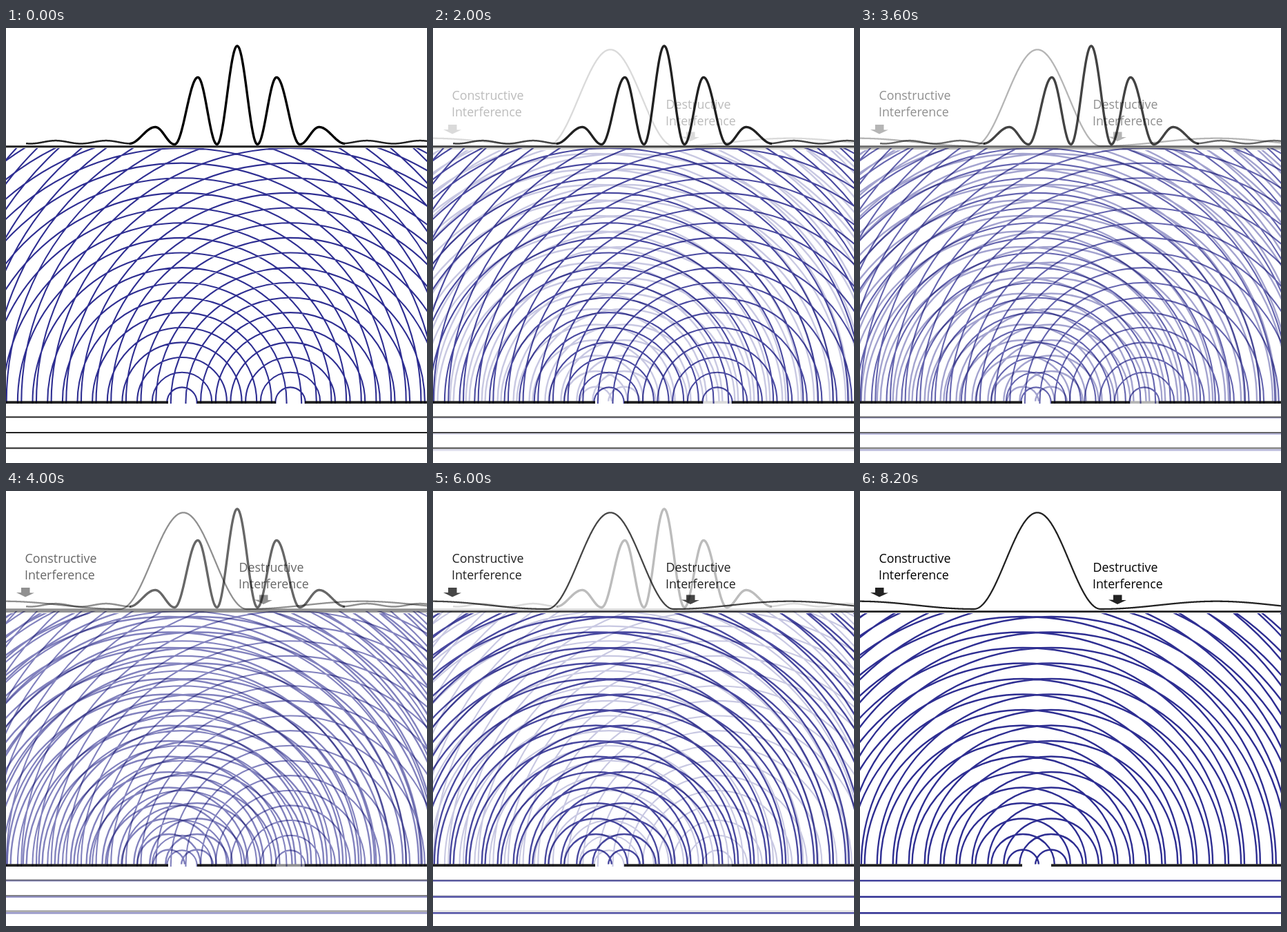
Recreate the animation shown at these times as an HTML page with a canvas. Size 610 px wide and 630 px high, loop 9000 ms.

```html
<!DOCTYPE html>
<html>
<head>
<meta charset="utf-8">
<style>
html, body { margin: 0; overflow: hidden; background: #fff; }
canvas { display: block; }
</style>
</head>
<body>
<canvas id="stage" width="610" height="630"></canvas>
<script>
const ctx = document.getElementById('stage').getContext('2d');
const BLUE = '#2e2e92', INK = '#222';
const WIDTH = 610, HEIGHT = 630, SLIT_Y = 542;

function stroke(color, width) {
  ctx.strokeStyle = color;
  ctx.lineWidth = width;
  ctx.stroke();
}

function line(y, width, color, x0 = 0, x1 = WIDTH) {
  ctx.beginPath();
  ctx.moveTo(x0, y);
  ctx.lineTo(x1, y);
  stroke(color, width);
}

const wall = (x0, x1) => line(SLIT_Y + 0.2, 3.8, INK, x0, x1);

function planeWaves(y, gap, width, color) {
  for (let i = 0; i < 3; i++) line(y + i * gap, width, color);
}

// Both wave families share one path so crossings do not darken.
function waves(centers, stepX, stepY, top, bottom, width) {
  ctx.save();
  ctx.beginPath();
  ctx.rect(0, top, WIDTH, bottom - top);
  ctx.clip();
  ctx.beginPath();
  for (const cx of centers) {
    for (let n = 1; n <= 26; n++) {
      const rx = n * stepX;
      ctx.moveTo(cx - rx, SLIT_Y + 3);
      ctx.lineTo(cx - rx, SLIT_Y);
      ctx.ellipse(cx, SLIT_Y, rx, n * stepY, 0, Math.PI, 2 * Math.PI);
      ctx.lineTo(cx + rx, SLIT_Y + 3);
    }
  }
  stroke(BLUE, width);
  ctx.restore();
}

function plot(f, x0, x1, width, color) {
  ctx.beginPath();
  for (let x = x0; x <= x1; x += 0.5) ctx.lineTo(x, f(x));
  ctx.lineJoin = 'round';
  stroke(color, width);
}

// Cosine easing from a to b as t goes from 0 to 1.
const ease = (a, b, t) => a + (b - a) * (1 - Math.cos(Math.PI * t)) / 2;

const ripple = (crest, period) =>
  x => 165.3 - 2.2 * Math.cos(2 * Math.PI * (x - crest) / period);

// Extremes as [distance from the middle, y]; both sides mirror each other.
const FRINGES = [[0, 26], [29.3, 168.5], [57, 71.5], [90.7, 168.5], [118.7, 143.5], [156.5, 167.5]];

function fringes(x) {
  const d = Math.abs(x - 335);
  const i = FRINGES.findIndex(([edge]) => edge > d);
  const [d0, y0] = FRINGES[i - 1], [d1, y1] = FRINGES[i];
  return ease(y0, y1, (d - d0) / (d1 - d0));
}

function singlePeak(x) {
  const d = Math.abs(x - 257), foot = 92;
  if (d < foot) return ease(31.3, 171, d / foot);
  return 171 - 11.3 * Math.sin(Math.PI * (d - foot) / 335) ** 2;
}

function label(word, x, y) {
  ctx.fillStyle = '#000';
  ctx.font = '17.8px "Open Sans", "Noto Sans", sans-serif';
  ctx.fillText(word, x, y);
  ctx.fillText('Interference', x - 0.5, y + 24);
}

function arrow(x, y) {
  ctx.beginPath();
  ctx.rect(x - 6, y, 12.5, 8);
  ctx.moveTo(x - 13, y + 7);
  ctx.lineTo(x + 13, y + 7.5);
  ctx.lineTo(x, y + 13.5);
  ctx.fillStyle = INK;
  ctx.fill();
}

// Waves, text and fringes fade less evenly than the thin dark lines.
const strong = amount => amount ** 0.75;

function wideSlits(amount) {
  ctx.globalAlpha = strong(amount);
  waves([255, 412], 21.65, 21.65, 174, 544, 2.1);
  plot(fringes, 179, 491, 3.4, '#000');
  ctx.globalAlpha = amount;
  line(171.8, 3, INK);
  planeWaves(563.5, 22.5, 2, INK);
  plot(ripple(72, 73), 29, 181, 2.5, INK);
  plot(ripple(523, 77), 488, WIDTH, 2.5, INK);
}

function narrowSlits(amount) {
  ctx.globalAlpha = strong(amount);
  waves([236, 277], 22.93, 22.5, 177, 540.5, 2.4);
  label('Constructive', 27.5, 104);
  label('Destructive', 337.5, 117);
  ctx.globalAlpha = amount;
  line(174.6, 2.8, INK);
  planeWaves(564.4, 23.4, 2.4, BLUE);
  wall(391, 433);
  plot(singlePeak, 0, WIDTH, 2.3, INK);
  arrow(28, 140);
  arrow(373, 150.5);
}

function draw(now) {
  const second = Math.floor(now % 9000 / 1000);
  const mix = Math.min(6, Math.max(0, second - 1)) / 6;
  ctx.globalCompositeOperation = 'source-over';
  ctx.globalAlpha = 1;
  ctx.fillStyle = '#fff';
  ctx.fillRect(0, 0, WIDTH, HEIGHT);
  ctx.globalCompositeOperation = 'multiply';
  if (mix < 1) wideSlits(1 - mix);
  if (mix > 0) narrowSlits(mix);
  ctx.globalAlpha = 1;
  wall(0, 235);
  wall(277, 391);
  wall(433, WIDTH);
}

const start = performance.now();
function tick() {
  draw(performance.now() - start);
  requestAnimationFrame(tick);
}
tick();
</script>
</body>
</html>
```
